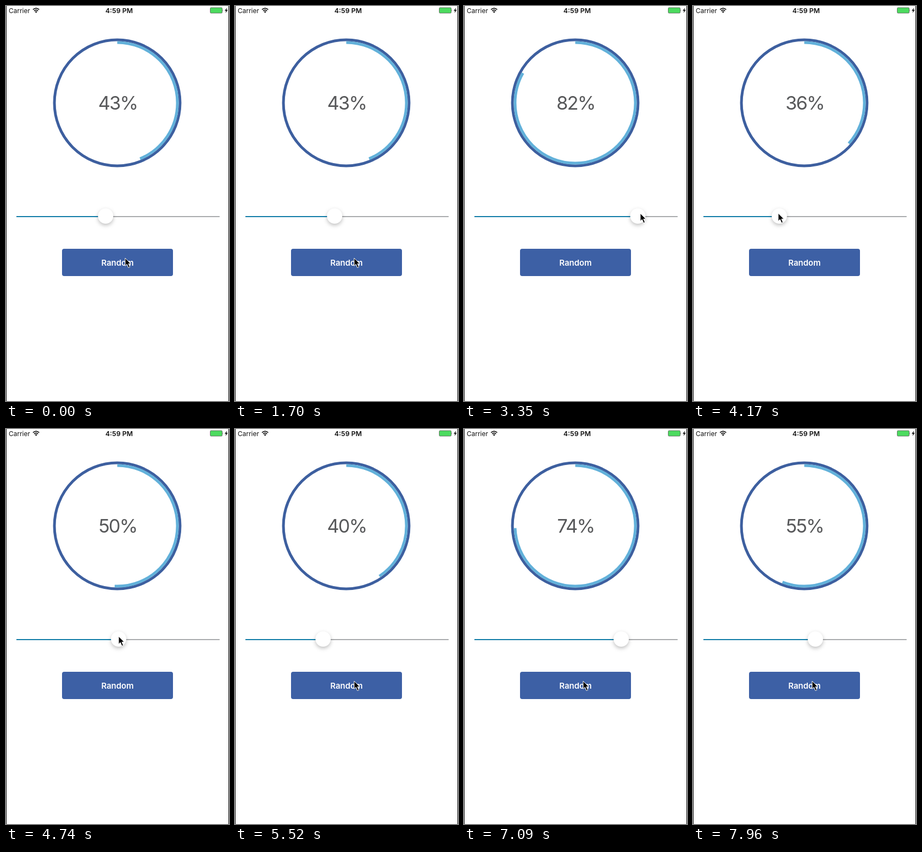
These frames come from a looping animation (410x724 px, 8000 ms). An HTML page:

```html
<!DOCTYPE html>
<html lang="en">
<head>
<meta charset="utf-8">
<title>Progress ring</title>
<style>
  html, body { margin: 0; width: 100%; height: 100%; overflow: hidden; background: #fff; }
  svg { display: block; width: 100%; height: 100%; }
  text { font-family: Inter, Roboto, sans-serif; }
  .thumb { filter: drop-shadow(0 3px 3.5px rgba(0, 0, 0, .25)); }
</style>
</head>
<body>
<svg viewBox="0 0 410 724">
  <rect width="410" height="724" fill="#fff"/>
  <path d="M.5 0V724M409.5 0V724" stroke="#111"/>

  <g id="status">
    <text x="5" y="13" font-size="12" fill="#111">Carrier</text>
    <path d="M49.6 6.7Q55.3 1.7 61 6.7M51.7 9Q55.3 5.8 58.9 9" fill="none" stroke="#111" stroke-width="1.7"/>
    <path d="M53.2 10.4Q55.3 8.8 57.4 10.4L55.3 12.8Z" fill="#111"/>
    <text x="208" y="13" font-size="12.4" font-weight="600" text-anchor="middle" fill="#111">4:59 PM</text>
    <rect x="375.5" y="3" width="22" height="10" rx="1.5" fill="#4cdb5f" stroke="#555" stroke-width=".8"/>
    <path d="M398.6 6.3Q400 8 398.6 9.7Z" fill="#555"/>
    <path d="M406.3 3.2L402 8.7H404.6L403.5 12.8L408 7.2H405.3Z" fill="#111"/>
  </g>

  <g fill="none" stroke-width="5">
    <circle cx="204.5" cy="177.5" r="115.5" stroke="#3d5f9f"/>
    <circle id="arc" cx="204.5" cy="177.5" r="110.6" stroke="#62b1da"
            pathLength="100" transform="rotate(-90 204.5 177.5)"/>
  </g>
  <text id="label" x="205.5" y="190" font-size="34.5" letter-spacing="-1.8" text-anchor="middle" fill="#58595b"></text>

  <rect x="19" y="385" width="374" height="2" rx="1" fill="#a9abad"/>
  <rect id="fill" x="19" y="385" height="2" rx="1" fill="#107ca8"/>
  <circle id="thumb" class="thumb" cy="385" r="14" fill="#fff"/>

  <rect x="103" y="445" width="204" height="50" rx="4" fill="#3d60a5"/>
  <text x="205" y="475.5" font-size="15" font-weight="600" text-anchor="middle" fill="#fff">Random</text>

  <path id="cursor" d="M0 0V14.4L3.3 11.3L6 17.6L8.7 16.5L6 10.4H10.4Z"
        fill="#000" stroke="#fff" stroke-linejoin="round"/>
</svg>
<script>
  const LOOP = 8000;
  const $ = id => document.getElementById(id);

  const drags = [
    { start: 2250, end: 2850, goal: 100 },
    { start: 3048, end: 4371, goal: 25 },
    { start: 4400, end: 4740, goal: 50.3 }
  ];
  const presses = [
    { start: 5450, goal: 28 },
    { start: 6020, goal: 62.4 },
    { start: 6800, goal: 74 },
    { start: 7500, goal: 55.5 }
  ];

  const ramp = (t, start, end) => Math.min(1, Math.max(0, (t - start) / (end - start)));
  const mix = (a, b, p) => a + (b - a) * p;
  const easeOut = p => 1 - (1 - p) ** 2;

  // Drags follow the hand; a press eases to its value over `duration`.
  function percent(t, duration) {
    const dragged = drags.reduce((v, d) => mix(v, d.goal, ramp(t, d.start, d.end)), 43.4);
    return presses.reduce((v, p) =>
      mix(v, p.goal, easeOut(ramp(t, p.start, p.start + duration))), dragged);
  }

  function draw(t) {
    const slider = percent(t, 200);
    const ring = percent(t, 276);
    const x = 33 + 3.46 * slider;
    $("thumb").setAttribute("cx", x);
    $("fill").setAttribute("width", x - 19);
    $("arc").setAttribute("stroke-dasharray", `${Math.min(100, ring + 0.4)} 100`);
    $("label").textContent = `${Math.floor(ring)}%`;

    // The pointer leaves the button, drags the thumb, then returns.
    const reach = ramp(t, 1720, 2150) - ramp(t, 4980, 5350);
    const px = mix(219, 207 + 3.6 * (slider - 50.3), reach);
    $("cursor").setAttribute("transform", `translate(${px} ${mix(462, 380, reach)})`);
  }

  const begin = performance.now();
  function frame() {
    draw((performance.now() - begin) % LOOP);
    requestAnimationFrame(frame);
  }
  frame();
</script>
</body>
</html>
```
